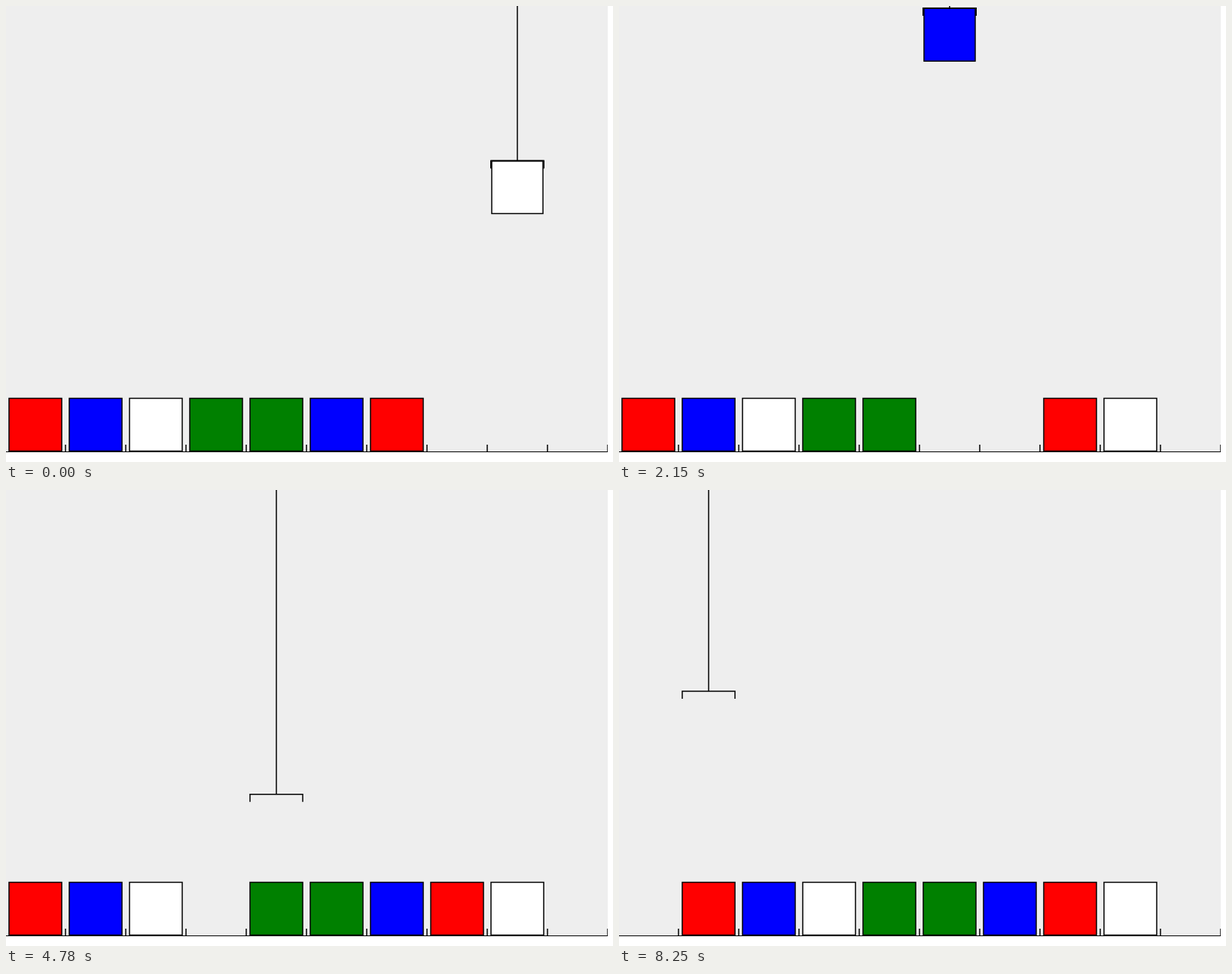
Recreate the animation shown at these times as an HTML page with a canvas. Size 806x605 px, loop 8320 ms.

```html
<!DOCTYPE html>
<html>
<head>
<meta charset="utf-8">
<style>
  html, body { margin: 0; width: 100%; height: 100%; overflow: hidden; background: #fff; }
  canvas { display: block; }
</style>
</head>
<body>
<canvas id="stage" width="806" height="605"></canvas>
<script>
const ctx = document.getElementById("stage").getContext("2d");
const LOOP = 8320, TICK = 77.04, LAST = 107;
const TOP = 2, FLOOR = 520.5, SPEED = 162;
const TRAVEL = (FLOOR - TOP) / SPEED;   // ticks for one full drop or lift
const LEFT = 1.6;                       // ticks for two columns to the left
const COLORS = ["white", "red", "blue", "green", "green", "white", "blue", "red"];
// Tick at which each box is released one column to the right
const RELEASE = [1.945, 16.805, 31.53, 46.44, 61.28, 75.985, 90.81, 105.435];

const center = col => 39 + 80 * col;
const ease = (a, b, p) => a + (b - a) * Math.min(1, Math.max(0, p));

function line(...pts) {
  ctx.beginPath();
  for (let i = 0; i < pts.length; i += 2) ctx.lineTo(pts[i], pts[i + 1]);
  ctx.stroke();
}

function box(x, y, half, color) {
  ctx.fillStyle = color;
  ctx.fillRect(x - half, y, 2 * half, 70);
  ctx.strokeRect(x - half, y, 2 * half, 70);
}

// Arm position and whether it holds the next box
function armAt(tick, done) {
  const next = RELEASE[done] ?? Infinity;
  const dropStart = next - TRAVEL;
  if (tick >= dropStart)
    return { col: 8 - done, y: FLOOR - (next - tick) * SPEED, held: true };

  const since = tick - RELEASE[done - 1];
  const reach = TRAVEL + LEFT, grab = reach + TRAVEL, lifted = grab + TRAVEL;
  const from = 9 - done, to = 7 - done;
  if (since < TRAVEL) return { col: from, y: FLOOR - since * SPEED };
  if (since < reach) return { col: ease(from, to, (since - TRAVEL) / LEFT), y: TOP };
  if (since < grab) return { col: to, y: TOP + (since - reach) * SPEED };
  if (since < lifted) return { col: to, y: FLOOR - (since - grab) * SPEED, held: true };
  const span = dropStart - RELEASE[done - 1] - lifted;
  return { col: ease(to, to + 1, (since - lifted) / span), y: TOP, held: true };
}

function draw(ms) {
  const tick = Math.min(LAST, Math.floor((ms % LOOP + 15) / TICK));
  const done = RELEASE.filter(r => r <= tick).length;
  const arm = armAt(tick, done);
  const x = center(arm.col);

  ctx.fillStyle = "#fff";
  ctx.fillRect(0, 0, 806, 605);
  ctx.save();
  ctx.beginPath();
  ctx.rect(0, 0, 799, 592);
  ctx.clip();
  ctx.fillStyle = "#eee";
  ctx.fillRect(0, 0, 799, 592);
  ctx.strokeStyle = "#000";

  ctx.lineWidth = 1;
  line(0, 591.5, 799, 591.5);
  ctx.lineWidth = 1.5;
  for (let i = 1; i <= 10; i++) line(80 * i - 1, 582, 80 * i - 1, 592);

  COLORS.forEach((color, i) => {
    if (i === done && arm.held) box(x, arm.y, 34, color);
    else box(center(i < done ? 8 - i : 7 - i), FLOOR, 35, color);
  });

  line(x, 0, x, arm.y);
  ctx.lineWidth = arm.held ? 2 : 1.5;
  line(x - 35, arm.y + 10, x - 35, arm.y, x + 35, arm.y, x + 35, arm.y + 10);
  ctx.restore();
}

const start = performance.now();
function loop() {
  draw(performance.now() - start);
  requestAnimationFrame(loop);
}
loop();
</script>
</body>
</html>
```
